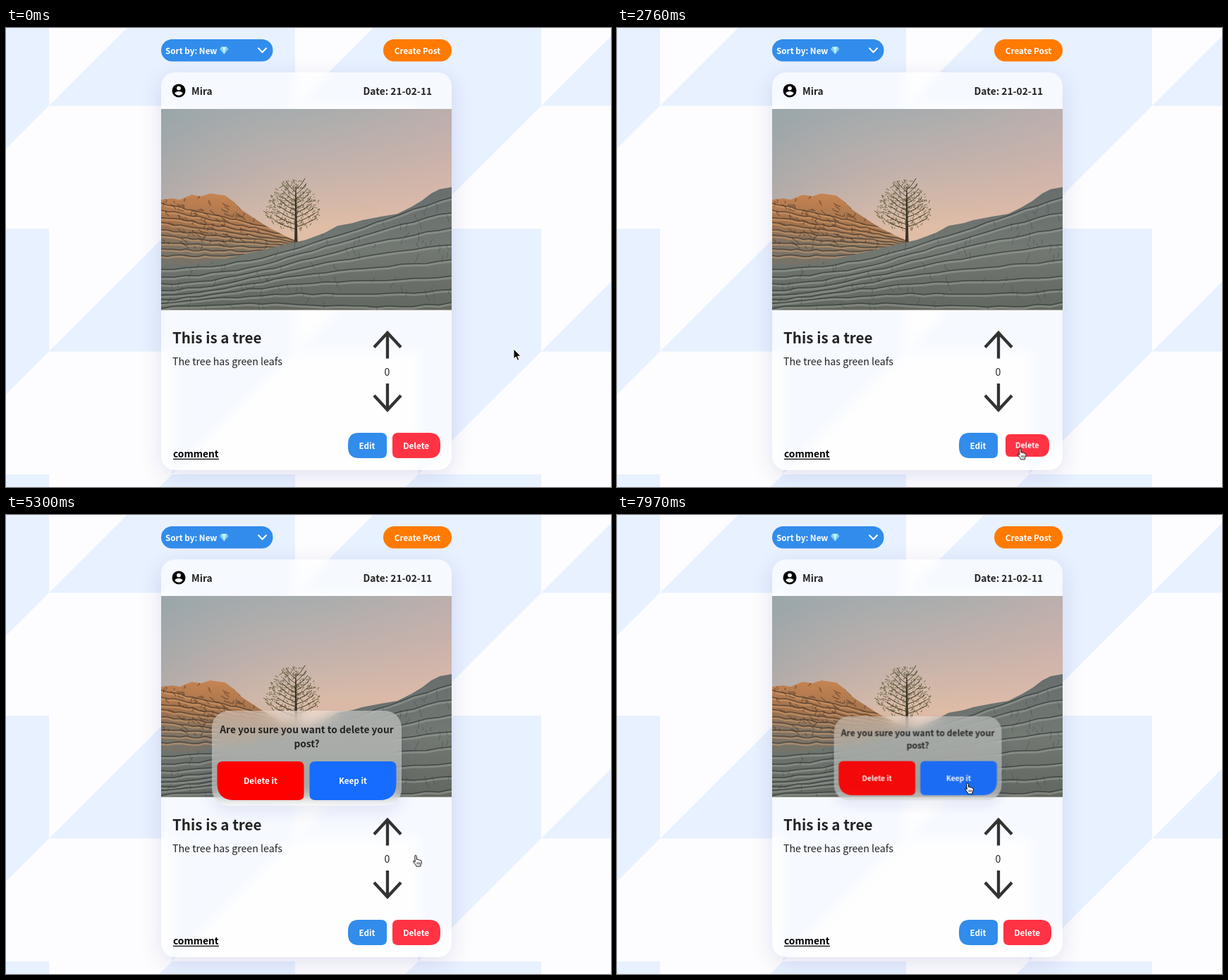
Write an HTML page that moves like this. It is 858 px wide and 652 px high and loops after 7990 ms.

```html
<!DOCTYPE html>
<html lang="en">
<head>
<meta charset="utf-8">
<title>Post card</title>
<style>
  html, body { margin: 0; width: 100%; height: 100%; overflow: hidden; background: #fdfdff; }
  #stage { position: relative; width: 858px; height: 652px; overflow: hidden; }
  #stage > svg { position: absolute; left: 0; top: 0; }
  text { font-family: "Noto Sans CJK SC", "Noto Sans CJK JP", "Noto Sans CJK", "Open Sans", sans-serif; font-size: 13.75px; font-weight: 600; fill: #222; }
  .title { font-size: 20.6px; }
  .small { font-size: 11.7px; fill: #fff; }
  .mid { text-anchor: middle; }
  .plain { font-size: 14.2px; font-weight: 400; }
  #card, #modal { position: absolute; box-sizing: border-box; }
  #card {
    left: 220px; top: 63px; width: 412px; height: 565px; border-radius: 20px;
    background: rgba(255,255,255,.6); backdrop-filter: blur(8px);
    box-shadow: 0 8px 32px rgba(31,38,135,.13);
  }
  #modal {
    left: 291.5px; top: 278px; width: 269px; height: 135px; border-radius: 24px;
    background: rgba(255,255,255,.4); backdrop-filter: blur(9px);
    box-shadow: 0 8px 24px rgba(31,38,135,.1);
  }
  #modal svg { display: block; }
  #delete { transform-box: fill-box; transform-origin: center; }
</style>
</head>
<body>
<div id="stage">
  <svg width="858" height="652">
    <defs>
      <pattern id="tiles" x="61" y="285" width="349" height="349" patternUnits="userSpaceOnUse">
        <path fill="#e8f1ff" d="M174.5 0H349V174.5L174.5 349V174.5H0Z"/>
      </pattern>
    </defs>
    <rect width="858" height="652" fill="#fdfdff"/>
    <rect width="858" height="652" fill="url(#tiles)"/>
  </svg>

  <div id="card"></div>

  <svg width="858" height="652">
    <defs>
      <linearGradient id="sky" x1=".4" x2=".5" y1="0" y2=".6">
        <stop stop-color="#a3acae"/><stop offset=".5" stop-color="#c2b2ac"/><stop offset="1" stop-color="#e3bfa6"/>
      </linearGradient>
      <linearGradient id="glow" x1="0" x2="1">
        <stop stop-color="#8a9ca4" stop-opacity=".35"/><stop offset=".5" stop-color="#c4aca8" stop-opacity=".08"/>
        <stop offset="1" stop-color="#d4b0ac" stop-opacity=".35"/>
      </linearGradient>
      <linearGradient id="sunlit" x1=".3" x2=".2" y1="0" y2="1">
        <stop stop-color="#c68452"/><stop offset=".4" stop-color="#a0714c"/><stop offset=".6" stop-color="#837361"/>
        <stop offset="1" stop-color="#6f736e"/>
      </linearGradient>
      <linearGradient id="stone" x1="0" x2="0" y1="0" y2="1">
        <stop stop-color="#676e6d"/><stop offset=".5" stop-color="#727872"/><stop offset="1" stop-color="#626860"/>
      </linearGradient>
      <clipPath id="leftClip"><use href="#leftHill"/></clipPath>
      <clipPath id="rightClip"><use href="#rightHill"/></clipPath>
    </defs>

    <rect x="220" y="16" width="158.5" height="31.5" rx="15.75" fill="#318ceb"/>
    <text class="small" x="226" y="36.5">Sort by: New</text>
    <path fill="#7fd0f2" d="M305.5 26.5H313L315.5 30 309.3 37.5 303 30Z"/>
    <path fill="#c9f0fc" d="M306 27H312.5L311 30H307.5ZM307.5 30H311L309.3 37Z"/>
    <path d="M358 28.8 363.5 34.5 369 28.8" fill="none" stroke="#fff" stroke-width="2" stroke-linecap="round" stroke-linejoin="round"/>
    <rect x="535" y="16" width="97" height="31.5" rx="15.75" fill="#ff7a00"/>
    <text class="small mid" x="583.5" y="36.5">Create Post</text>

    <circle cx="245" cy="89" r="9.5"/>
    <circle cx="245" cy="85.6" r="2.9" fill="#fff"/>
    <path d="M239.3 92.6Q241 90 245 90T250.7 92.6Q248.5 95.8 245 95.8T239.3 92.6Z" fill="#fff"/>
    <text x="263" y="95">Mira</text>
    <text x="506.5" y="95">Date: 21-02-11</text>

    <svg x="220" y="115" width="412" height="285.5" viewBox="220 115 412 285.5">
      <rect x="220" y="115" width="412" height="286" fill="url(#sky)"/>
      <rect x="220" y="115" width="412" height="286" fill="url(#glow)"/>
      <path id="leftHill" fill="url(#sunlit)" d="M220 244 236 242 246 244 263 237 277 239 290 235 311 238 323 247 335 259 350 269 370 282 395 295 414 303 420 320 220 350Z"/>
      <g clip-path="url(#leftClip)" fill="none">
        <path id="leftLights" stroke="#e0a873" stroke-opacity=".45" stroke-width="2"/>
        <path id="leftSeams" stroke="#40352c" stroke-opacity=".7" stroke-width="1.3"/>
        <path id="leftCracks" stroke="#4d3626" stroke-opacity=".55" stroke-width="1.3"/>
      </g>
      <path id="rightHill" fill="url(#stone)" d="M632 226 615 229 603 235 590 245 575 254 555 264 531 268 505 273 492 277 470 281 452 291 425 301 390 309 340 321 300 330 262 337 220 336V401H632Z"/>
      <g clip-path="url(#rightClip)" fill="none">
        <path id="rightLights" stroke="#a3a79f" stroke-opacity=".45" stroke-width="3"/>
        <path id="rightSeams" stroke="#333938" stroke-opacity=".7" stroke-width="1.5"/>
        <path id="rightCracks" stroke="#363c3a" stroke-opacity=".4"/>
      </g>
      <path id="twigs" fill="none" stroke="#5e5b35" stroke-opacity=".75" stroke-width="1.1"/>
      <path id="boughs" fill="none" stroke="#453e2c" stroke-width="1"/>
      <path d="M409 304 410.4 225 411.4 225 413.5 304Z" fill="#3a3328"/>
    </svg>

    <text class="title" x="236" y="448">This is a tree</text>
    <text class="plain" x="236" y="479">The tree has green leafs</text>
    <g fill="none" stroke="#333" stroke-width="4.3">
      <path d="M541 469.5V433M522 453.5 541 433 560 453.5"/>
      <path d="M541 505V542M522 522 541 542.5 560 522"/>
    </g>
    <text class="plain mid" x="540.5" y="494">0</text>
    <text x="237" y="610" style="fill:#000">comment</text>
    <path d="M237 612.3H302" stroke="#000" stroke-width="1.3"/>

    <path fill="#318ceb" d="M500.5 575H532Q540 575 540 583V603Q540 611 532 611H500.5Q485 611 485 595V591Q485 575 500.5 575Z"/>
    <text class="small mid" x="512" y="597.5">Edit</text>
    <g id="delete">
      <path fill="#ff3344" d="M556 575H600Q616 575 616 591V595Q616 611 600 611H556Q548 611 548 603V583Q548 575 556 575Z"/>
      <text class="small mid" x="581.7" y="597.5">Delete</text>
    </g>
  </svg>

  <div id="modal">
    <svg width="269" height="135">
      <text class="mid" x="134.5" y="32">Are you sure you want to delete your</text>
      <text class="mid" x="134.5" y="52">post?</text>
      <path fill="#f00" d="M15.5 72H122.5Q130.5 72 130.5 80V119Q130.5 127 122.5 127H31.5Q7.5 127 7.5 103V80Q7.5 72 15.5 72Z"/>
      <path fill="#156cff" d="M146.5 72H253.5Q261.5 72 261.5 80V103Q261.5 127 237.5 127H146.5Q138.5 127 138.5 119V80Q138.5 72 146.5 72Z"/>
      <text class="small mid" x="69" y="104">Delete it</text>
      <text class="small mid" x="200" y="104">Keep it</text>
    </svg>
  </div>

  <svg width="858" height="652">
    <g id="cursor">
      <path id="arrow" fill="#000" stroke="#fff" stroke-width="1" d="M0 0V14L3.2 11 5.3 16 7.7 15 5.6 10.2H10Z"/>
      <g id="hand" stroke="#000" stroke-linejoin="round">
        <path fill="#fff" d="M3.2 10 2.9 2.5Q2.8 .6 4 .6T5.3 2.3L5.6 6.5Q7.6 5.6 8 7 9.8 6.4 10.2 7.8 12.4 7.4 12.5 9.6 12.6 12.6 11 14V16.2H5Q4.6 14.4 3.2 13L.8 9.8Q.4 8.2 1.8 8.4 2.6 8.9 3.2 10Z"/>
        <path fill="none" stroke-width=".8" d="M6.2 10.5V13.5M8.1 10.5V13.5M10 10.5V13.5"/>
      </g>
    </g>
  </svg>
</div>

<script>
const LOOP = 7990;
const el = id => document.getElementById(id);

let seed = 11;
const rand = (lo = 0, hi = 1) => {
  seed = (seed * 16807) % 2147483647;
  return lo + (hi - lo) * seed / 2147483647;
};
const repeat = (count, make) => Array.from({ length: count }, (_, i) => make(i / count)).join('');
const draw = (id, d) => el(id).setAttribute('d', d);

// A slightly uneven line along y = height(u), with u running from 0 to 1.
const seam = (x0, x1, height) => 'M' + repeat(24, t => {
  const u = t * 24 / 23;
  return `${x0 + (x1 - x0) * u} ${height(u) + rand(-1.3, 1.3)} `;
});

// Rock layers sweep down towards the foot of the tree.
const leftLayers = repeat(9, t =>
  seam(220, 425, u => 250 + 82 * t + (58 - 70 * t) * u * u + 8 * Math.sin(4 * u) * (1 - t)));
const rightLayers = repeat(8, t => {
  const right = 246 + 160 * t, left = 342 + 66 * t;
  return seam(220, 632, u => left + (right - left) * u ** 1.4 + 6 * Math.sin(5 * u + 4 * t));
});
for (const [side, layers] of [['left', leftLayers], ['right', rightLayers]]) {
  draw(side + 'Seams', layers);
  draw(side + 'Lights', layers);
  el(side + 'Lights').setAttribute('transform', 'translate(0 2.5)');
}
draw('leftCracks', repeat(110, () => {
  const x = rand(220, 375), y = rand(238, 310);
  return `M${x} ${y}q${rand(-2, 6)} ${rand(0, 3)} ${rand(-3, 10)} ${rand(2, 7)}`;
}));
draw('rightCracks', repeat(110, () => {
  const x = rand(220, 632), y = rand(245, 400);
  return `M${x} ${y}q${rand(-4, 4)} ${rand(2, 5)} ${rand(-6, 6)} ${rand(6, 14)}`;
}));

// Bare boughs with a haze of twigs around them.
draw('boughs', repeat(18, t => {
  const side = Math.round(t * 18) % 2 ? 1 : -1, y = 286 - 60 * t, reach = side * (30 - 18 * t);
  return `M411 ${y}q${reach * .5} -4 ${reach} ${-12 - 4 * t}`;
}));
draw('twigs', repeat(420, () => {
  const a = rand(0, 2 * Math.PI), r = rand() ** .6;
  const y = 252 + 38 * r * Math.sin(a);
  const width = 20 + 20 * Math.min(1, (y - 211) / 50);
  const x = 408 + width * r * Math.cos(a);
  return `M${x} ${y}l${(x - 408) / 14 + rand(-3, 3)} ${rand(-4, 2)}`;
}));

const play = (id, steps) => el(id).animate(
  steps.map(([ms, style]) => ({ offset: ms / LOOP, ...style })),
  { duration: LOOP, iterations: Infinity });

const move = (x, y, easing = 'ease-in-out') => ({ transform: `translate(${x}px,${y}px)`, easing });
const show = opacity => ({ opacity, easing: 'step-end' });
const scale = (s, easing = 'ease-out') => ({ transform: `scale(${s})`, easing });
const pop = (s, opacity, easing = 'linear') => ({ ...scale(s, easing), opacity });

play('cursor', [
  [0, move(720, 456)], [600, move(720, 456)], [1600, move(564, 600)],
  [1900, move(564, 600)], [2300, move(567.5, 596.5)], [4500, move(567.5, 596.5, 'ease-in')],
  [5300, move(577, 483, 'ease-out')], [6100, move(493, 380)], [LOOP, move(493, 380)]
]);
play('arrow', [[0, show(1)], [1400, show(0)], [LOOP, show(0)]]);
play('hand', [[0, show(0)], [1400, show(1)], [LOOP, show(1)]]);
play('delete', [
  [0, scale(1)], [2640, scale(1)], [2740, scale(.91)], [2800, scale(.91)], [2920, scale(1)], [LOOP, scale(1)]
]);
play('modal', [
  [0, pop(0, 0)], [2900, pop(0, 0, 'cubic-bezier(.3,.3,.5,.9)')], [3600, pop(.944, .97, 'ease-out')],
  [3800, pop(1, 1)], [7760, pop(1, 1, 'ease-in')], [7970, pop(.885, .92)], [LOOP, pop(.86, .9)]
]);
</script>
</body>
</html>
```
